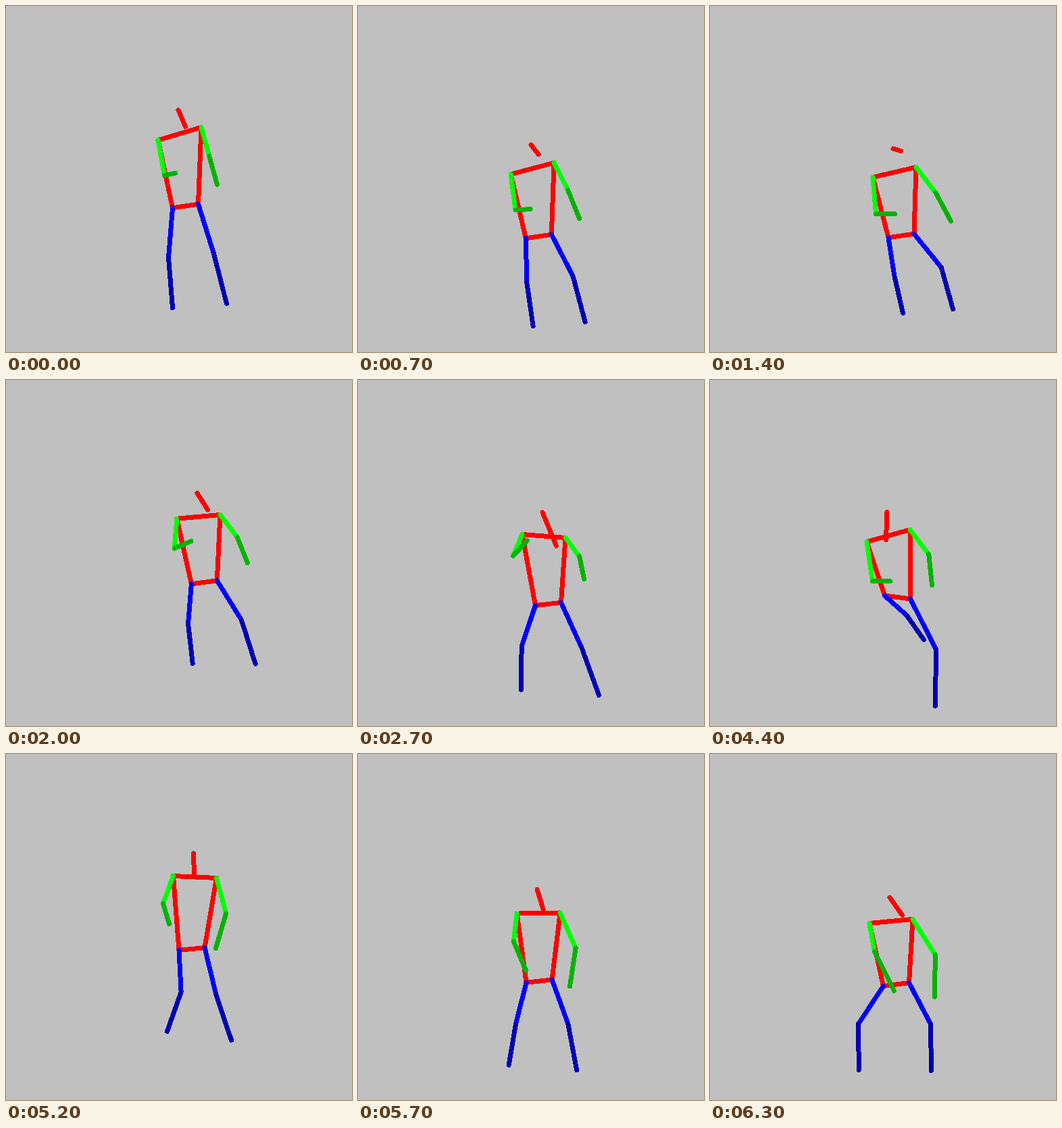
An HTML page that plays this animation: 512 px wide and 512 px high, repeating every 6400 ms.

```html
<!DOCTYPE html>
<html lang="en">
<head>
<meta charset="utf-8">
<title>Moving stick figure</title>
<style>
  html, body { margin: 0; width: 100%; height: 100%; overflow: hidden; background: #c0c0c0; }
  svg { display: block; }
  polyline { fill: none; stroke-width: 7; stroke-linecap: round; stroke-linejoin: round; }
</style>
</head>
<body>
<svg id="stage" width="512" height="512" viewBox="0 0 512 512">
  <g id="figure" transform="translate(.5 .5)" shape-rendering="crispEdges"></g>
</svg>
<script>
const LOOP = 6400, STEP = 100;

// Key poses. chest: centre and tilt; arms: left elbow, left wrist, right wrist;
// feet: left and right; knees: sideways bend; sink: dip on the way to the next pose.
const poses = [
  { at: 0, sink: 23, chest: [256.5, 188.5, -19], neck: [265, 178], hips: [265, 295.5],
    arms: [234, 250, 250, 247, 312, 264], feet: [246, 446, 326, 440], knees: [-6, 2] },
  { at: 1400, sink: -37, chest: [272.5, 245.5, -15], neck: [282, 214], hips: [282.5, 339.5],
    arms: [245, 307, 273, 307, 356, 318], feet: [285, 454, 359, 448], knees: [-2, 13] },
  { at: 2700, sink: -32, chest: [274.5, 230.5, 5], neck: [293, 245], hips: [281, 331],
    arms: [229, 260, 250, 237, 334, 294], feet: [241, 458, 356, 466], knees: [-10, 3] },
  { at: 3600, sink: 8, chest: [292, 262, -7], neck: [286, 260], hips: [285.5, 357.5],
    arms: [249, 325, 245, 351, 332, 344], feet: [285, 468, 335, 474], knees: [1, 12] },
  { at: 4400, sink: -25, chest: [263.5, 230, -18], neck: [260, 236], hips: [277, 321],
    arms: [240, 297, 266, 297, 328, 303], feet: [316, 384, 333, 482], knees: [5, 20] },
  { at: 5200, sink: 24, chest: [279, 181.5, 3], neck: [278, 179], hips: [274.5, 288],
    arms: [232, 221, 241, 251, 310, 287], feet: [238, 410, 333, 423], knees: [12, -3] },
  { at: 6300, sink: 0, chest: [267.5, 247, -6], neck: [284, 238], hips: [275, 340.5],
    arms: [243, 292, 272, 350, 332, 359], feet: [220, 467, 327, 468], knees: [-20, 16] }
];

const figure = document.getElementById('figure');
function line(color) {
  const el = document.createElementNS('http://www.w3.org/2000/svg', 'polyline');
  el.setAttribute('stroke', color);
  figure.append(el);
  return (...points) => el.setAttribute('points', points.join(' '));
}
const limb = (upper, lower) => {
  const a = line(upper), b = line(lower);
  return (top, mid, end) => { a(top, mid); b(mid, end); };
};
const drawHead = line('#f00'), drawTrunk = line('#f00');
const drawArms = [limb('#0f0', '#00b400'), limb('#0f0', '#00b400')];
const drawLegs = [limb('#00f', '#0000b4'), limb('#00f', '#0000b4')];

// Both ends of a tilted bar around its centre.
const bar = (x, y, width, tilt) =>
  [[x - width / 2, y - tilt / 2], [x + width / 2, y + tilt / 2]];

// Middle joint of a limb, pushed to its right by bend.
function joint([x1, y1], [x2, y2], bend) {
  const dx = x2 - x1, dy = y2 - y1, k = bend / Math.hypot(dx, dy);
  return [x1 + dx / 2 + dy * k, y1 + dy / 2 - dx * k];
}

function draw(t) {
  const i = Math.max(0, poses.findLastIndex(p => p.at <= t && p !== poses.at(-1)));
  const a = poses[i], b = poses[i + 1];
  const k = Math.min(1, (t - a.at) / (b.at - a.at));
  const get = part => a[part].map((v, n) => v + (b[part][n] - v) * k);

  // A dip drifts left, a hop drifts right.
  const sink = a.sink * Math.sin(Math.PI * k);
  figure.setAttribute('transform', `translate(${.5 - .3 * sink} ${.5 + sink})`);

  const [cx, cy, tilt] = get('chest');
  const [ex, ey, lx, ly, rx, ry] = get('arms');
  const [flx, fly, frx, fry] = get('feet');
  const knees = get('knees');
  const feet = [[flx, fly], [frx, fry]];
  const shoulders = bar(cx, cy, 64, tilt);
  // The pelvis tips towards the lower foot.
  const hips = bar(...get('hips'), 38, (fry - fly) / 10 - 5);

  drawHead([cx - 2, cy - 35], get('neck'));
  drawTrunk(shoulders[0], shoulders[1], hips[1], hips[0], shoulders[0]);
  drawArms[0](shoulders[0], [ex, ey], [lx, ly]);
  // The right elbow opens steadily over the loop.
  drawArms[1](shoulders[1], joint(shoulders[1], [rx, ry], 18 * t / LOOP), [rx, ry]);
  drawLegs.forEach((leg, n) => leg(hips[n], joint(hips[n], feet[n], knees[n]), feet[n]));
}

const start = performance.now();
function tick() {
  const t = (performance.now() - start) % LOOP;
  draw(Math.floor(t / STEP) * STEP);
  requestAnimationFrame(tick);
}
tick();
</script>
</body>
</html>
```
